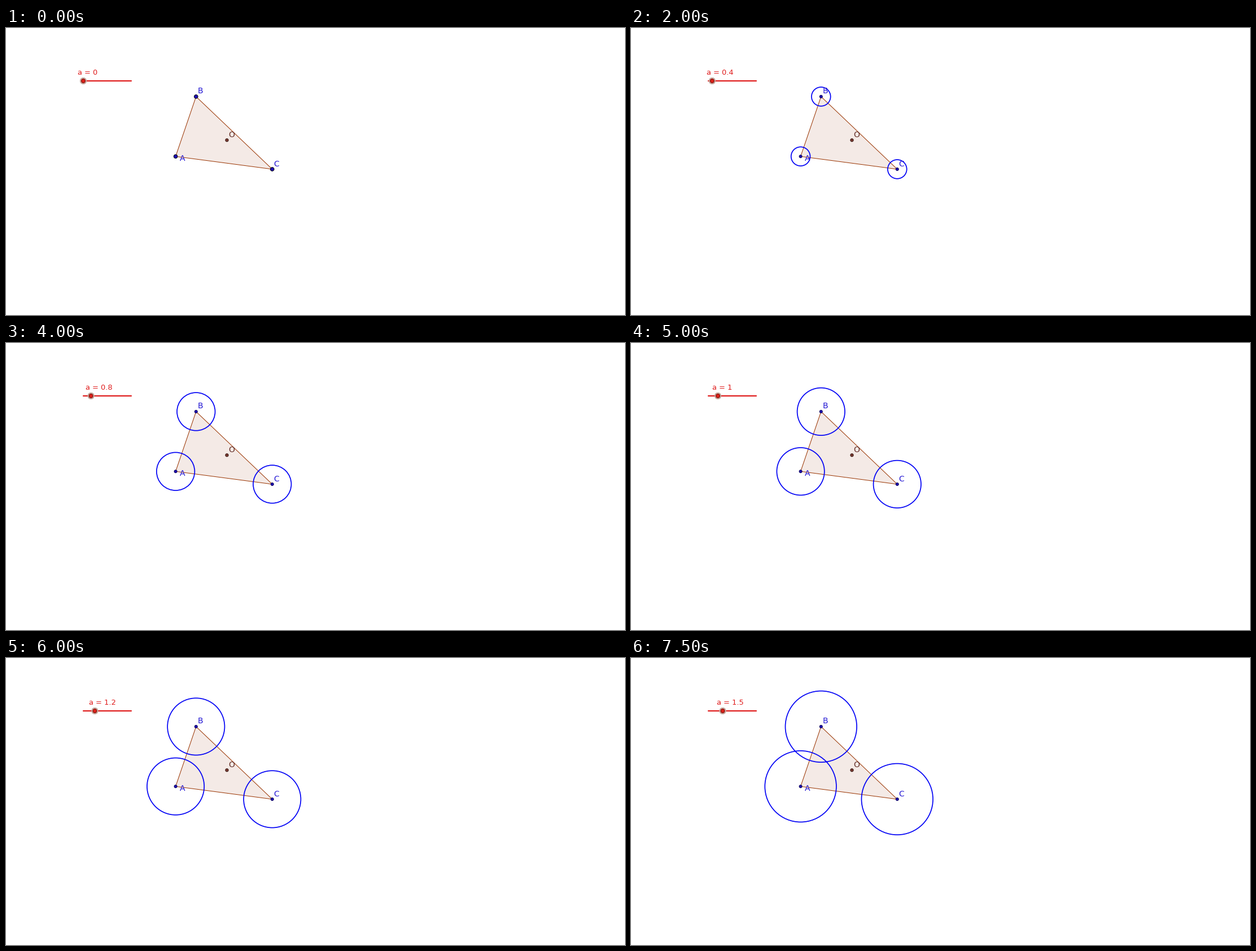
These frames come from a looping animation (1097x510 px, 8 s). A matplotlib script:

```python
import matplotlib.pyplot as plt
from matplotlib.animation import FuncAnimation
from matplotlib.patches import Circle, Polygon

W, H, DPI = 1097, 510, 64
PT = 72 / DPI               # points per pixel
FRAMES, INTERVAL = 16, 500
UNIT = 42.2                 # circle radius in pixels for a = 1
SLIDER_X, SLIDER_Y, SLIDER_STEP = 137, 94, 17

BLUE, RED, BROWN = "#0000f5", "#e01c1c", "#993300"
VERTICES = {"A": (300.6, 228.2), "B": (336.8, 121.9), "C": (471.8, 250.9)}
LABELS = {"A": (308.3, 235.5), "B": (339.5, 116.5), "C": (474.2, 245.5)}
CENTRE = (391.5, 199.3)

plt.rcParams["font.family"] = "DejaVu Sans"
fig = plt.figure(figsize=(W / DPI, H / DPI), dpi=DPI, facecolor="white")
ax = fig.add_axes([0, 0, 1, 1])
ax.set_xlim(0, W)
ax.set_ylim(H, 0)
ax.axis("off")


def disc(centre, radius, face, edge, width, z):
    return ax.add_patch(Circle(centre, radius, facecolor=face, edgecolor=edge,
                               linewidth=width * PT, zorder=z))


def write(pos, text, size, color):
    return ax.text(*pos, text, fontsize=size * PT, color=color,
                   va="baseline", ha="left", zorder=6)


# Triangle with its inner point
corners = list(VERTICES.values())
ax.add_patch(Polygon(corners, facecolor="#f4eae6", edgecolor="none", zorder=1))
ax.add_patch(Polygon(corners, fill=False, edgecolor=BROWN, linewidth=PT,
                     joinstyle="round", zorder=2))
disc(CENTRE, 2.6, "#7c3a30", "#30100c", 1, 5)
write((394.2, 194), "O", 14, "#64302a")

# Growing circles around the corners
rings = [disc(p, 0, "none", BLUE, 1.7, 3) for p in corners]
dots = [disc(p, 2.5, "#1c0cb4", "#10085c", 1, 5) for p in corners]
for name, pos in LABELS.items():
    write(pos, name, 14, "#2418d4")

# Slider
ax.plot([SLIDER_X, SLIDER_X + 5 * SLIDER_STEP], [SLIDER_Y] * 2, color=RED,
        linewidth=2.2 * PT, solid_capstyle="round", zorder=3)
halo = disc((SLIDER_X, SLIDER_Y), 5.7, "#d6aea2", "#b9a096", 0.8, 4)
knob = disc((SLIDER_X, SLIDER_Y), 3.5, "#dc2018", "#6e1410", 1, 5)
caption = write((127, 82.7), "", 13, RED)


def draw(i):
    a = i / 10
    x = SLIDER_X + SLIDER_STEP * a
    for ring in rings:
        ring.set_radius(UNIT * a)
        ring.set_visible(i > 0)
    for dot in dots:
        dot.set_radius(2.5 if i else 3.3)
        dot.set_edgecolor("#10085c" if i else "#101010")
    halo.center = knob.center = (x, SLIDER_Y)
    caption.set_x(x - 10)
    caption.set_text(f"a = {a:g}")
    return [*rings, *dots, halo, knob, caption]


anim = FuncAnimation(fig, draw, frames=FRAMES, interval=INTERVAL,
                     init_func=lambda: draw(0), repeat=True, repeat_delay=0)
plt.show()
```
